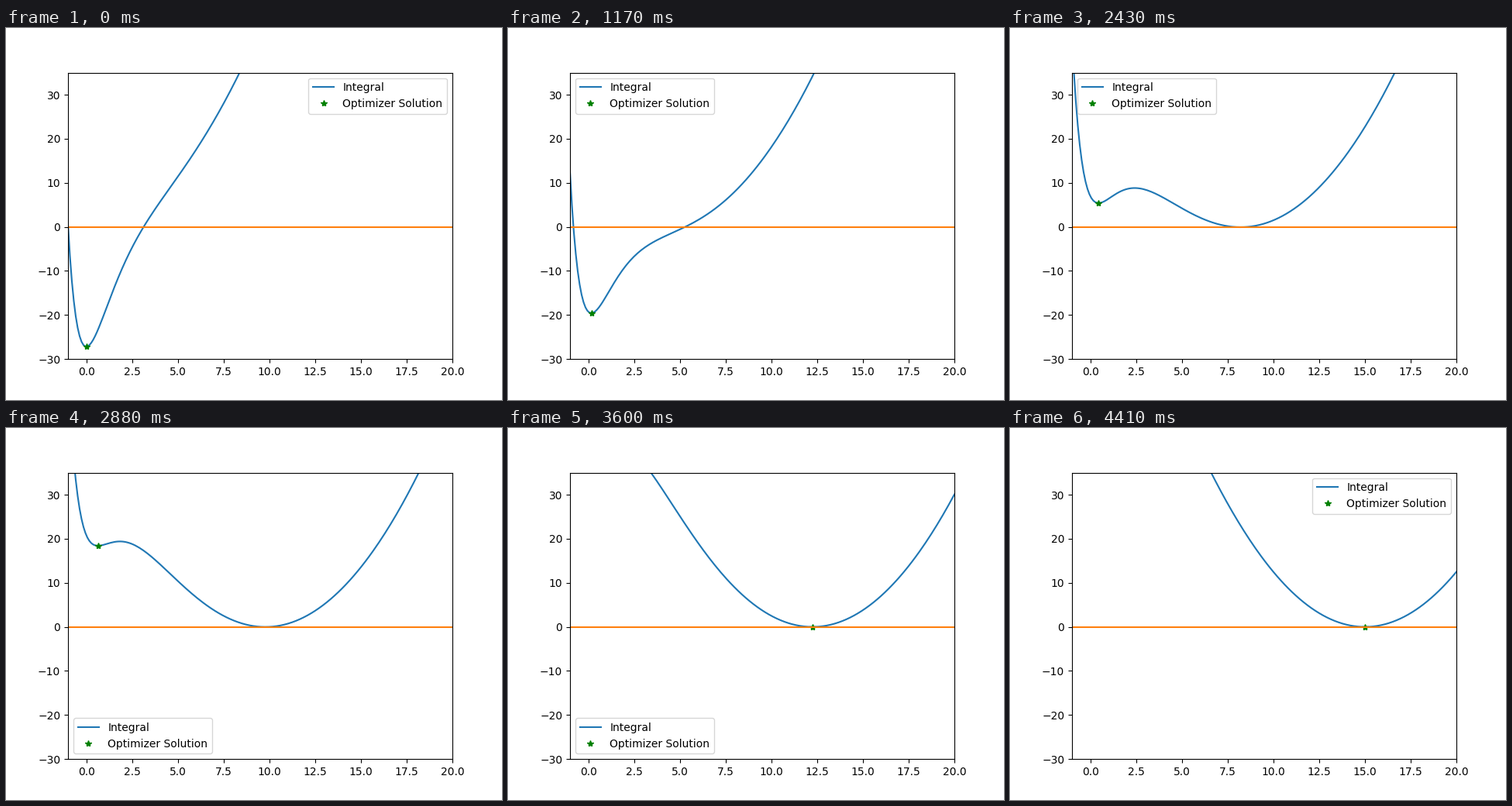
Recreate the animation shown at these times as a matplotlib script. Size 640 by 480 pixels, loop 4.5 s.

```python
import numpy as np
import matplotlib.pyplot as plt
from matplotlib.animation import FuncAnimation

FRAMES = 50
INTERVAL = 90
X_RANGE = (-1, 20)

targets = np.linspace(0, 15, FRAMES)
x = np.linspace(*X_RANGE, 200)
search = np.linspace(0, 20, 20001)


def integral(x, target):
    return 0.5 * (x - target) ** 2 - 10 * (x + 1) * np.exp(1 - x)


def slope(x, target):
    return x - target + 10 * x * np.exp(1 - x)


def first_minimum(target):
    """Leftmost point where the curve stops falling."""
    return search[np.argmax(slope(search, target) >= 0)]


fig, ax = plt.subplots(figsize=(6.4, 4.8), dpi=100)
curve, = ax.plot([], [], color="C0", label="Integral")
star, = ax.plot([], [], "g*", label="Optimizer Solution")
ax.plot(X_RANGE, (0, 0), color="C1")
ax.set_xlim(*X_RANGE)
ax.set_ylim(-30, 35)
ax.legend(loc="best")  # moves to a free corner on every draw


def update(frame):
    target = targets[frame]
    best = first_minimum(target)
    curve.set_data(x, integral(x, target))
    star.set_data([best], [integral(best, target)])
    return curve, star


anim = FuncAnimation(fig, update, frames=FRAMES, interval=INTERVAL,
                     init_func=lambda: update(0), repeat=True, repeat_delay=0)
plt.show()
```
